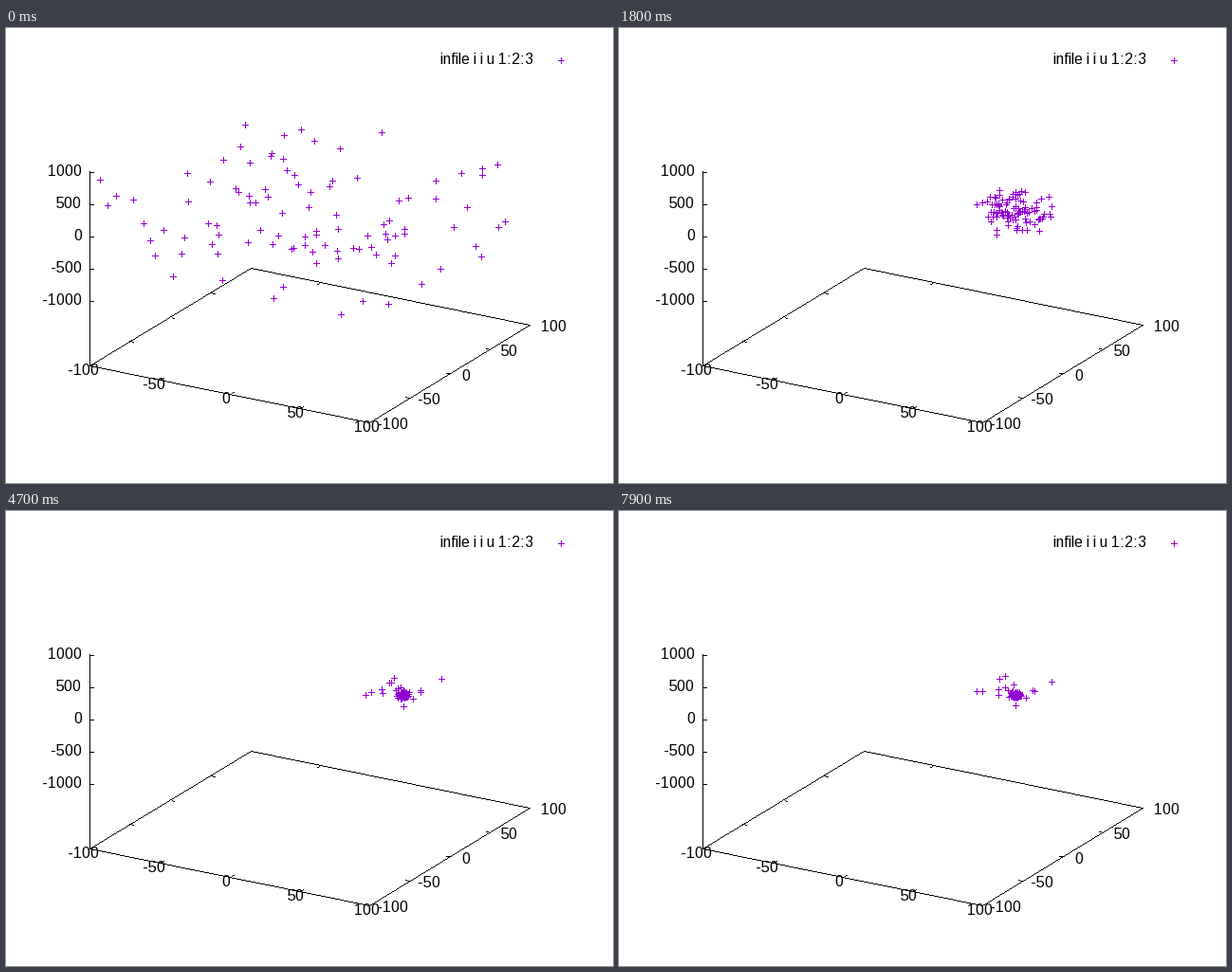
These frames come from a looping animation (640 px wide and 480 px high, 8000 ms). A matplotlib script:

```python
import numpy as np
import matplotlib.pyplot as plt
from matplotlib.animation import FuncAnimation

W, H, DPI = 640, 480, 100
FRAMES, STEP = 80, 100
PX = 72 / DPI
PURPLE = "#9400d3"
COUNT = 100

plt.rcParams["text.hinting_factor"] = 1

# Corners of the base plane, and the height of the z axis on screen.
LEFT, BACK, RIGHT, FRONT = np.array([(88, 356), (258, 253), (552, 313), (383, 416)])
Z_TOP, Z_LOW = 152, 288

# The optimum, and the settling places of the points that stay outside it.
BEST = np.array([418, 194])
STRAY = [(458, 177), (377, 190), (383, 192), (409, 174), (403, 182),
         (406, 183), (397, 187), (401, 193), (418, 205), (435, 189),
         (437, 191), (428, 197), (417, 184), (411, 187)]


def project(x, y, z):
    """Screen position of a point; x, y and z run from -1 to 1."""
    p = LEFT + np.outer((x + 1) / 2, FRONT - LEFT) + np.outer((y + 1) / 2, BACK - LEFT)
    p[:, 1] += (Z_LOW + Z_TOP) / 2 - LEFT[1] - z * (Z_LOW - Z_TOP) / 2
    return p


def swarm_path(rng):
    """Scattered points rush to the optimum while their search radius shrinks."""
    x, y, z = rng.uniform(-1, 1, (3, COUNT))
    start = project(x, y, 0.8 * z)
    home = BEST + rng.normal(0, 1, (COUNT, 2)).clip(-2, 2) * (2.4, 1.8)
    home[:len(STRAY)] = STRAY
    swing = rng.normal(0, 1, (COUNT, 2)).clip(-2.2, 2.2) * (90, 52)
    swing[:len(STRAY)] *= 0.4
    shake = 0.5 + 0.05 * np.hypot(*(home - BEST).T)[:, None]

    path = np.empty((FRAMES, COUNT, 2))
    for t in range(FRAMES):
        far = np.exp(-t / 4)
        radius = np.exp(-t / 11)
        noise = rng.normal(0, 1, (COUNT, 2)) * (shake + 5 * radius)
        path[t] = home + (start - home) * far + (swing * radius + noise) * (1 - far)
    return path


def crosses(points):
    """Pixel-aligned plus signs, 7 px wide, as one broken line."""
    x, y = np.rint(points).T
    gap = np.full_like(x, np.nan)
    xs = np.column_stack([x - 3, x + 4, gap, x + 0.5, x + 0.5, gap])
    ys = np.column_stack([y + 0.5, y + 0.5, gap, y - 3, y + 4, gap])
    return xs.ravel(), ys.ravel()


def pixels(p, q):
    """One-pixel steps from p to q, as one broken line."""
    p, q = np.rint(p), np.rint(q)
    n = int(np.abs(q - p).max()) + 1
    x, y = np.rint(np.linspace(p, q, n)).T
    gap = np.full_like(x, np.nan)
    return (np.column_stack([x, x + 1, gap]).ravel(),
            np.column_stack([y + 0.5, y + 0.5, gap]).ravel())


fig = plt.figure(figsize=(W / DPI, H / DPI), dpi=DPI, facecolor="white")
ax = fig.add_axes([0, 0, 1, 1])
ax.set_xlim(0, W)
ax.set_ylim(H, 0)
ax.axis("off")


def line(xs, ys, color="black", z=1):
    return ax.plot(xs, ys, color=color, lw=PX, antialiased=False, snap=False,
                   solid_capstyle="butt", zorder=z)[0]


def label(x, y, s, ha):
    ax.text(round(x), round(y), s, ha=ha, va="baseline", family="Liberation Sans",
            fontsize=16 * PX, color="black", zorder=3)


def edge(p, q, tick, stops=(0.25, 0.5, 0.75)):
    """Base edge with inward ticks."""
    line(*pixels(p, q))
    for u in stops:
        m = p + (q - p) * u
        line(*pixels(m, m + tick))


edge(LEFT, FRONT, (4, -2))
edge(FRONT, RIGHT, (-4, -1))
edge(LEFT, BACK, (4, 1))
edge(BACK, RIGHT, (-4, 2), stops=(0.25,))
line(*pixels((LEFT[0], Z_TOP - 1), LEFT))

for i in range(5):
    u = i / 4
    z = Z_LOW + (Z_TOP - Z_LOW) * u
    line(*pixels((LEFT[0], z), (LEFT[0] + 4, z)))
    label(80, z + 3.6, str(-1000 + 500 * i), "right")

    # Positive numbers keep room for a sign.
    value = -100 + 50 * i
    room = 4 if value >= 0 else 0
    x, y = LEFT + (FRONT - LEFT) * u
    label(x - 5.5 + room / 2, y + 9.6, str(value), "center")
    x, y = FRONT + (RIGHT - FRONT) * u
    label(x + 8.4 + room, y + 7, str(value), "left")

label(556, 38, "infile i i u 1:2:3", "right")
line(*crosses(np.array([[585, 34]])), PURPLE)

PATH = swarm_path(np.random.default_rng(12))
cloud = line([], [], PURPLE, 2)


def draw(i):
    cloud.set_data(*crosses(PATH[i]))
    return (cloud,)


anim = FuncAnimation(fig, draw, frames=FRAMES, interval=STEP,
                     repeat=True, repeat_delay=0)
plt.show()
```
